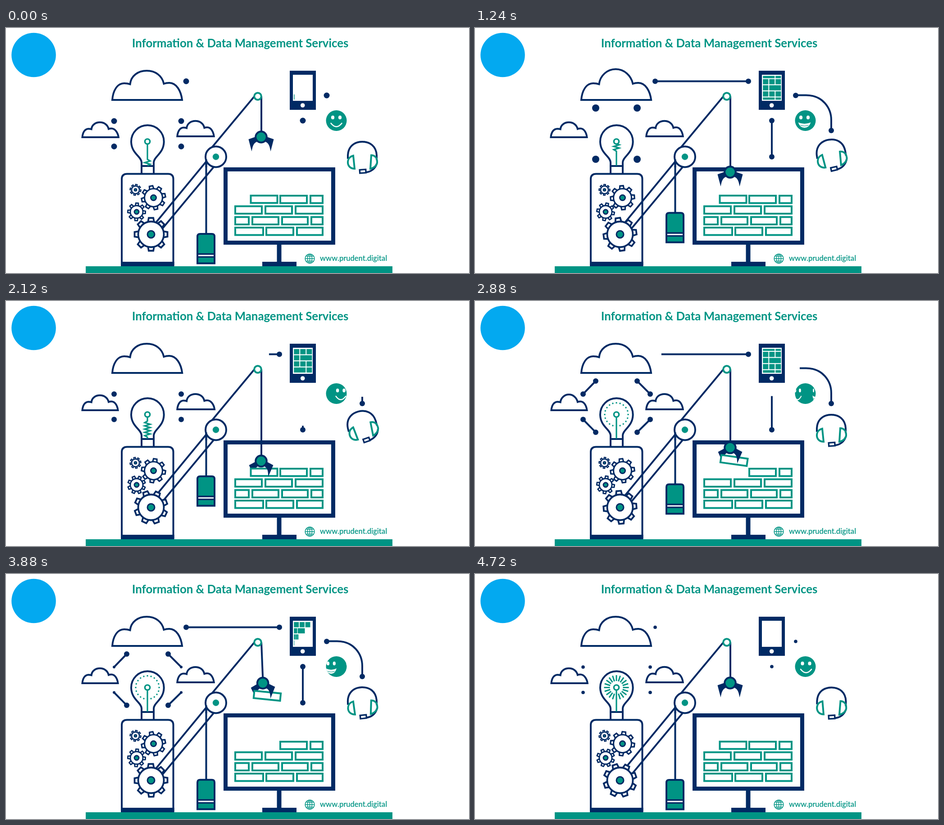
These frames come from a looping animation (1028x545 px, 4.76 s). An HTML page:

```html
<!DOCTYPE html>
<html lang="en">
<head>
<meta charset="utf-8">
<title>Information &amp; Data Management Services</title>
<style>
html, body { margin: 0; width: 100%; height: 100%; overflow: hidden; background: #fff; }
svg { display: block; width: 100%; height: 100%; }
text { font-family: Lato, "Open Sans", sans-serif; fill: #009484; }
.n { fill: #002a64; }
.t { fill: #009484; }
.w { fill: #fff; }
.ln { fill: none; stroke: #002a64; stroke-width: 4; }
.box { fill: #fff; stroke: #002a64; stroke-width: 4; }
.tl { fill: none; stroke: #009484; stroke-width: 4; }
.tb { fill: #fff; stroke: #009484; stroke-width: 4; }
</style>
</head>
<body>
<svg id="stage" viewBox="0 0 1028 545" preserveAspectRatio="none"></svg>
<script>
const LOOP = 4760, STEP = 40;
const stage = document.getElementById('stage');
const $ = id => document.getElementById(id);
const set = (id, attrs) => { for (const k in attrs) $(id).setAttribute(k, attrs[k]); };
const clamp = v => Math.max(0, Math.min(1, v));
const sine = u => (1 - Math.cos(Math.PI * u)) / 2;
const cubic = u => u < .5 ? 4 * u ** 3 : 1 - 4 * (1 - u) ** 3;
const span = (t, a, b) => clamp((t - a) / (b - a));
const rad = deg => deg * Math.PI / 180;

// Eased value along [time, value] pairs.
function key(t, pairs, ease = sine) {
  if (t <= pairs[0][0]) return pairs[0][1];
  for (let i = 1; i < pairs.length; i++) {
    const [a, va] = pairs[i - 1], [b, vb] = pairs[i];
    if (t <= b) return va + (vb - va) * ease((t - a) / (b - a));
  }
  return pairs[pairs.length - 1][1];
}

const rect = (cls, x, y, x2, y2, more = '') =>
  `<rect class="${cls}" x="${x}" y="${y}" width="${x2 - x}" height="${y2 - y}" ${more}/>`;
const circle = (cls, x, y, r, more = '') =>
  `<circle class="${cls}" cx="${x}" cy="${y}" r="${r}" ${more}/>`;
const path = (cls, d, more = '') => `<path class="${cls}" d="${d}" ${more}/>`;

// Gears: centre, outer radius, body radius, hub radius, line, direction, start angle
const gears = [
  [322, 459, 36.5, 28.5, 8, 3.8, 1, 0],
  [327.5, 377.5, 26.5, 20, 6, 3.2, -1, -12],
  [290, 409, 19.5, 14, 5, 2.8, -1, 3],
  [287.5, 360, 12, 8.5, 2.6, 2.4, 1, 10]
];
function gear([x, y, R, r, hub, line], i) {
  let teeth = '';
  for (let k = 0; k < 8; k++)
    teeth += path('box', `M${-R * .19} ${-r + 2}L${-R * .14} ${-R}H${R * .14}L${R * .19} ${-r + 2}Z`,
      `transform="rotate(${k * 45})" style="stroke-width:${line}"`);
  return `<g transform="translate(${x} ${y})"><g id="gear${i}">${teeth}</g>` +
    circle('box', 0, 0, r, `style="stroke-width:${line}"`) +
    circle('t', 0, 0, hub, `stroke="#002a64" stroke-width="${Math.min(line, 3)}"`) + '</g>';
}

// Clouds: centre, base line, scale, times when left, top and right parts swell
const clouds = [
  [313.5, 160, 1, [720, 1240, 1700]],
  [209, 243, .51, [1240, 2900, 4740]],
  [421, 241, .525, [3300, 720, 2120]]
];
const cloud = ([x, y, s], i) =>
  `<path id="cloud${i}" class="box" vector-effect="non-scaling-stroke" transform="translate(${x} ${y}) scale(${s})"/>`;
function cloudPath([, , , times]) {
  const t = clock, [l, u, r] = times.map(c => {
    const d = Math.abs(t - c);
    return Math.exp(-((Math.min(d, LOOP - d) / 260) ** 2));
  });
  const L = -2 * l, U = -3.5 * u, R = 2.5 * r;
  return `M${-77.5 + L} 0C${-76 + L} -20 ${-67 + L} -37 -51 -37Q-44 -37 -38 -35` +
    `C-36 -54 -20 ${-65 + U} -1 ${-65 + U}C18 ${-65 + U} 33 -54 37 -36` +
    `Q42 -38 49 -38C65 -38 ${75 + R} -20 ${77.5 + R} 0Z`;
}

// Links: path and the two end points
const mainLinks = [
  ['M400 118.5H607', 400, 118.5, 607, 118.5],
  ['M712 149.5H735C772 149.5 791 178 791 205V228', 712, 150, 791, 228],
  ['M659 206V286.5', 659, 206, 659, 286.5]
];
const bulbLinks = [[240, 207, 268, 178], [389, 207, 360, 178], [240, 263.5, 268, 292], [389, 263.5, 360, 292]]
  .map(p => [`M${p[0]} ${p[1]}L${p[2]} ${p[3]}`, ...p]);
const links = [...mainLinks, ...bulbLinks];
const link = ([d, x1, y1, x2, y2], i) =>
  path('ln', d, `id="link${i}" pathLength="100"`) +
  circle('n', x1, y1, 6, `id="from${i}"`) + circle('n', x2, y2, 6, `id="to${i}"`);

const brick = (x, y, x2) => rect('tb', x + 2, y + 2, x2 - 2, y + 18.5);
const wall = [
  [371, 607, 670, 674, 705],
  [394.5, 507, 570, 574, 637, 641, 705],
  [418.5, 507, 541, 545, 607, 611, 672, 676, 705],
  [442, 507, 573, 576, 640, 644, 705]
].map(([y, ...xs]) => {
  let out = '';
  for (let i = 0; i < xs.length; i += 2) out += brick(xs[i], y, xs[i + 1]);
  return out;
}).join('');

// Phone rows as [x, width] cells
const rows = [
  [[0, 12], [14, 12], [28, 12]], [[0, 12], [14, 26]],
  [[0, 12], [14, 12], [28, 12]], [[0, 26], [28, 12]]
];
const PITCH = 13.6;
const cells = rows.map(r => r.map(([x, w]) => rect('t', x, 0, x + w, 11.5)).join(''));
const phone = rect('n', 630, 95, 688, 182) + rect('w', 637, 104, 681, 162) + circle('w', 658.7, 172, 4.8) +
  '<g clip-path="url(#screen)">' +
  [0, 1, 2, 3, 4, 5, 6, 7].map(i => `<g id="row${i}">${cells[i % 4]}</g>`).join('') + '</g>';

const eyes = '<ellipse class="w" cx="-8" cy="-7" rx="3.6" ry="4.3"/><ellipse class="w" cx="8" cy="-7" rx="3.6" ry="4.3"/>';
const smile = path('', 'M-12 6Q0 21 12 6', 'fill="none" stroke="#fff" stroke-width="2.6" stroke-linecap="round"');
const grin = path('w', 'M-14 4Q0 10 14 4Q10 16 0 16Q-10 16 -14 4Z') +
  path('', 'M-9 10Q0 14 9 10', 'fill="none" stroke="#009484" stroke-width="1.2"');
const face = circle('t', 733.5, 206, 23) + '<g clip-path="url(#head)">' +
  [0, 1, 2, 3, 4].map(i => `<g id="face${i}">${eyes}${i % 2 ? grin : smile}</g>`).join('') + '</g>';

const headset = '<g id="headset">' +
  path('ln', 'M759 291V283C760 263 774 253 791 253C808 253 822 263 823 283V294M823 302C820 313 810 320 799 321') +
  path('tb', 'M771 284C763 286 759 292 759 299C759 307 765 313 774 313Z', 'style="fill:none"') +
  path('tb', 'M811 283L809 313C818 311 825 304 824 297C824 289 819 283 811 283Z', 'style="fill:none"') +
  rect('box', 785.5, 315, 799, 322.5, 'transform="rotate(-4 792 319)" style="stroke-width:3.4"') + '</g>';

const arm = 'M8 -2L28 5L21 32C19 21 17 12 7 10Z';
const rig = '<g id="rig"><line id="cable" class="ln" x1="567" y1="152" x2="567"/>' +
  path('n', arm, 'id="armL"') + '<g id="load">' + rect('tb', -29.5, -8.2, 29.5, 8.2) + '</g>' +
  path('n', arm, 'id="armR"') + circle('t', 566.5, 0, 12.3, 'id="hub" stroke="#002a64" stroke-width="4"') + '</g>';

const weight = '<line id="rope" class="ln" x1="444.5" y1="292" x2="444.5"/><g id="weight">' +
  path('t', 'M425 523.5V464Q425 458 431 458H457Q463 458 463 464V523.5Z', 'stroke="#002a64" stroke-width="4"') +
  rect('n', 425, 501, 463, 511) + rect('w', 427, 504.6, 461, 507.6) + '</g>';

const bulb = path('box', 'M301 323V299C301 286 278 279 278 252.5A36.3 36.3 0 0 1 350.6 252.5C350.6 279 328 286 328 299V323') +
  path('ln', 'M301 307H328') +
  path('tl', '', 'id="rays" style="stroke-width:3"') + path('tl', '', 'id="filament" style="stroke-width:3.2"') +
  circle('tb', 314, 252.5, 5.6, 'style="stroke-width:3.4"');

const globe = '<g fill="none" stroke="#009484" stroke-width="1.5" transform="translate(674.5 513)">' +
  '<circle r="10.3"/><ellipse rx="5" ry="10.3"/><path d="M0 -10V10M-10 0H10M-8.5 -5.5H8.5M-8.5 5.5H8.5"/></g>';

stage.innerHTML =
  '<defs><clipPath id="screen"><rect x="639" y="106.5" width="41" height="53"/></clipPath>' +
  '<clipPath id="head"><circle cx="733.5" cy="206" r="23"/></clipPath></defs>' +
  '<circle cx="61.5" cy="60" r="49.3" fill="#03a9f0"/>' +
  '<text x="520" y="42.5" font-size="25.8" font-weight="700" text-anchor="middle">Information &amp; Data Management Services</text>' +
  clouds.map(cloud).join('') + links.map(link).join('') + phone + face + headset +
  rect('n', 483, 310, 731, 482) + rect('w', 492, 319, 722, 473) +
  rect('n', 601.5, 482, 611.5, 521) + rect('n', 569, 520, 645, 530) + wall +
  bulb +
  path('box', 'M257 527V336Q257 324.5 269 324.5H360Q371.5 324.5 371.5 336V527Z') + rect('n', 255, 520, 373.5, 530) +
  path('ln', 'M331 435L447 294M345 449L463 307M456 267L554 149') +
  gears.map(gear).join('') +
  weight + circle('box', 466, 286.5, 23) + circle('t', 466, 286.5, 7.2) + path('ln', 'M444.5 292V310') +
  rig + circle('tb', 559, 152, 7.8) +
  rect('t', 177, 530, 858, 545) + globe +
  '<text x="697" y="518" font-size="16.5" font-weight="600">www.prudent.digital</text>';

let clock = 0;

function drawLink(i, p, q, r1, r2) {
  set('link' + i, {
    'stroke-dasharray': `0 ${p * 100} ${(q - p) * 100} 300`,
    visibility: q - p > .005 ? 'visible' : 'hidden'
  });
  set('from' + i, { r: r1 });
  set('to' + i, { r: r2 });
}

function drawLinks(t) {
  const main = [
    key(t, [[1650, 0], [2250, 1], [2330, 1], [2990, 0]]),
    key(t, [[120, 0], [600, 1], [4080, 1], [4600, 0]]),
    key(t, [[0, 6.5], [120, 6], [1600, 6], [1700, 0], [2950, 0], [3040, 8], [3140, 6], [4640, 6], [4720, 3.8]]),
    key(t, [[580, 0], [700, 8], [740, 8], [860, 6], [3980, 6], [4080, 0]])
  ];
  const side = [
    key(t, [[820, 0], [1140, 1], [1280, 1], [1500, 0], [3060, 0], [3360, 1], [3560, 1], [3840, 0]]),
    key(t, [[120, 0], [480, 1], [1740, 1], [2220, 0], [2340, 0], [2720, 1], [4120, 1], [4500, 0]]),
    key(t, [[0, 6.5], [600, 6], [720, 8], [820, 0], [1480, 0], [1600, 7], [1700, 6], [2960, 6], [3060, 0],
      [3830, 0], [3930, 6], [4640, 6], [4720, 3.8]]),
    key(t, [[460, 0], [560, 6], [1140, 6], [1220, 8], [1260, 8], [1340, 6], [1720, 6], [1800, 0],
      [2700, 0], [2800, 6], [4080, 6], [4160, 0]])
  ];
  links.forEach((_, i) => drawLink(i, ...(i < 3 ? main : side)));
}

function drawBulb(t) {
  const u = t % 1000 / 1000, lin = v => v;
  const a = key(u, [[.74, 14.5], [.88, 24.5], [.95, 27.5]], lin);
  const b = key(u, [[.32, 14.5], [.55, 27.5]], lin);
  let d = '';
  if (b - a > .2) for (let k = 1; k < 20; k++) {
    const c = Math.cos(rad(90 + k * 18)), s = Math.sin(rad(90 + k * 18));
    d += `M${314 + a * c} ${252.5 + a * s}L${314 + b * c} ${252.5 + b * s}`;
  }
  set('rays', { d });
  const top = key(u, [[0, 295], [.12, 267], [.17, 257]], lin);
  const low = key(u, [[0, 305], [.12, 300], [.24, 271], [.29, 256]], lin);
  let f = 'M314 306';
  for (let y = 303, k = 0; y > 258; y -= 3.6, k++)
    f += `L${314 + (y > top && y < low ? (k % 2 ? -6 : 6) : 0)} ${y}`;
  set('filament', { d: f + 'L314 258' });
}

function drawPhone(t) {
  const scroll = 4 * PITCH * (key(t, [[870, 0], [2050, 1]], cubic) + key(t, [[2550, 0], [3640, 1]], cubic));
  for (let i = 0; i < 8; i++) {
    const r = i % 4, lag = (3 - r) * 70;
    const grow = sine(span(t, -50 + lag, 330 + lag)), shrink = 1 - sine(span(t, 3610 + lag, 3910 + lag));
    const y = 107 + (i - (i > 3 ? 8 : 0)) * PITCH + scroll % (4 * PITCH);
    set('row' + i, { transform: `translate(639.3 ${y}) scale(${Math.min(grow, shrink)} 1)` });
  }
}

function drawFaces(t) {
  for (let i = 0; i < 5; i++) {
    const a = 116 * (i - 4 * t / LOOP);
    set('face' + i, {
      transform: `translate(${733.5 + 23 * Math.sin(rad(a))} 206) scale(${Math.cos(rad(a))} 1)`,
      visibility: Math.abs(a) < 90 ? 'visible' : 'hidden'
    });
  }
}

function drawHeadset(t) {
  const a = key(t, [[0, 0], [360, -13], [720, 13], [1240, -9], [1680, 13], [2120, -15], [2500, 10], [2880, 0],
    [3500, 0], [3880, -2], [4300, -1], [4720, 1]]);
  set('headset', {
    transform: `translate(${Math.max(0, a) * .4} ${-Math.abs(a) * .55}) rotate(${a} 791 287)`
  });
}

function drawCrane(t) {
  const drop = key(t, [[250, 0], [1840, 1], [2335, 1], [3930, 0]]);
  const y = 242.5 + 113.5 * drop, up = -68 * drop;
  const grip = 9 * key(t, [[1840, 0], [2100, 1], [4230, 1], [4340, 0]]);
  const swing = key(t, [[3600, 0], [3880, -2.3], [4080, 1.5], [4250, 0]]);
  set('rig', { transform: `rotate(${swing} 567 152)` });
  set('cable', { y2: y });
  set('hub', { cy: y });
  set('armL', { transform: `translate(566.5 ${y}) scale(-1 1) rotate(${grip})` });
  set('armR', { transform: `translate(566.5 ${y}) rotate(${grip})` });
  const hold = sine(span(t, 2335, 2560)), fall = span(t, 4260, 4560) ** 2;
  let bx = 573, by = 381, tilt = 0;
  if (t > 2335) {
    bx += 2.2 * hold * (1 - fall);
    tilt = 8 * hold * (1 - fall);
    const held = y + 25 + 3.5 * hold;
    by = held + (381 - held) * fall;
  }
  set('load', { transform: `translate(${bx} ${by}) rotate(${tilt})` });
  set('weight', { transform: `translate(0 ${up})` });
  set('rope', { y2: 458 + up });
}

function draw(t) {
  clock = t;
  clouds.forEach((c, i) => set('cloud' + i, { d: cloudPath(c) }));
  gears.forEach((g, i) => set('gear' + i, { transform: `rotate(${g[7] + g[6] * t * .139})` }));
  drawLinks(t);
  drawBulb(t);
  drawPhone(t);
  drawFaces(t);
  drawHeadset(t);
  drawCrane(t);
}

function tick() {
  draw(Math.floor(performance.now() / STEP) * STEP % LOOP);
  requestAnimationFrame(tick);
}
tick();
</script>
</body>
</html>
```
